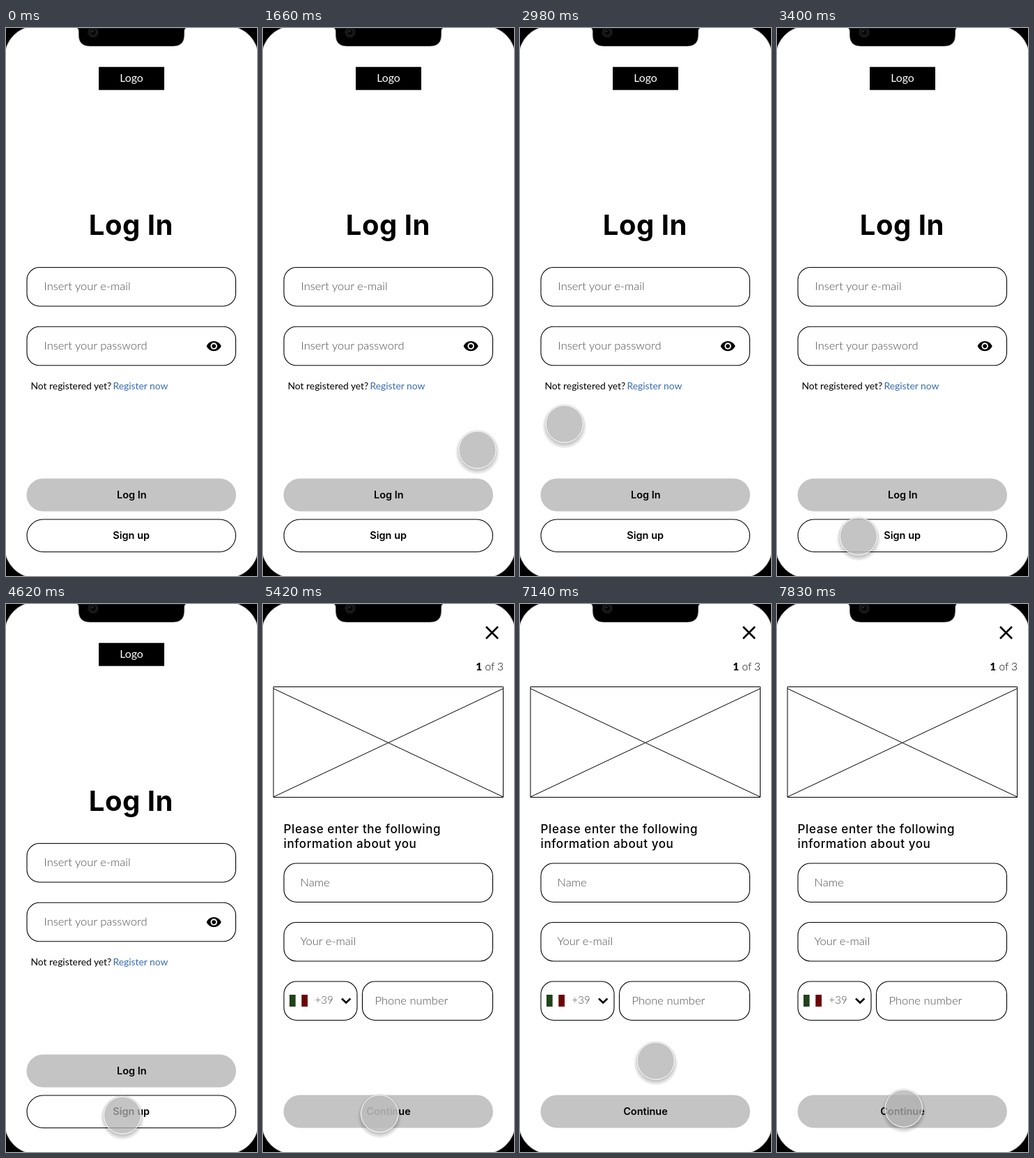
An HTML page for the animation above (8000 ms loop, 360 by 784 pixels).

```html
<!DOCTYPE html>
<html lang="en">
<head>
<meta charset="utf-8">
<title>Sign-up prototype</title>
<style>
  html, body { margin: 0; width: 100%; height: 100%; overflow: hidden; background: #000; }
  svg { display: block; width: 360px; height: 784px; }
  text { font-family: Lato, "Open Sans", sans-serif; }
  .field { fill: none; stroke: #000; stroke-width: 1.1; }
  .hint { font-size: 16.5px; font-weight: 300; fill: #4c4c4c; }
  .code { font-size: 15px; }
  .note { font-size: 13.85px; }
  .button { font: 600 14.5px Inter, sans-serif; text-anchor: middle; }
  .title { font: 700 40px Inter, sans-serif; letter-spacing: .5px; text-anchor: middle; }
  .lead { font: 500 17px Inter, sans-serif; letter-spacing: .6px; }
  .line { fill: none; stroke: #000; }
</style>
</head>
<body>
<svg viewBox="0 0 360 784">
  <defs>
    <radialGradient id="shade">
      <stop offset=".78" stop-color="#000" stop-opacity=".22"/>
      <stop offset="1" stop-color="#000" stop-opacity="0"/>
    </radialGradient>
    <mask id="outside" maskUnits="userSpaceOnUse" x="-40" y="-40" width="80" height="84">
      <rect x="-40" y="-40" width="80" height="84" fill="#fff"/>
      <circle r="27" fill="#000"/>
    </mask>
    <clipPath id="screen"><rect x="-2" y="-3" width="364" height="790" rx="45"/></clipPath>
  </defs>

  <rect width="360" height="784"/>
  <rect x="-2" y="-3" width="364" height="790" rx="45" fill="#fff" stroke="#888" stroke-width=".7"/>

  <g id="login">
    <rect x="133" y="55.7" width="94" height="33"/>
    <text x="180" y="77" font-size="15.8" fill="#fff" text-anchor="middle">Logo</text>
    <text class="title" x="179.3" y="296">Log In</text>
    <rect class="field" x="30" y="342.5" width="299.5" height="55.5" rx="18"/>
    <text class="hint" x="54.5" y="375">Insert your e-mail</text>
    <rect class="field" x="30" y="427.3" width="299.5" height="55.5" rx="18"/>
    <text class="hint" x="54.5" y="459.5">Insert your password</text>
    <path transform="translate(286.7 443.6) scale(.955)" fill-rule="evenodd" d="M12 4.5C7 4.5 2.73 7.61 1 12c1.73 4.39 6 7.5 11 7.5s9.27-3.11 11-7.5c-1.73-4.39-6-7.5-11-7.5zM7 12a5 5 0 0 1 10 0a5 5 0 0 1-10 0zM9 12a3 3 0 0 1 6 0a3 3 0 0 1-6 0z"/>
    <text class="note" x="35.5" y="517">Not registered yet?</text>
    <text class="note" x="153.5" y="517" fill="#386cb0">Register now</text>
    <rect x="29.5" y="644.5" width="300.5" height="47" rx="23.5" fill="#c4c4c4"/>
    <text class="button" x="180.3" y="673">Log In</text>
    <rect class="field" x="30" y="703" width="299.5" height="46.5" rx="23.2"/>
    <text class="button" x="179.7" y="731">Sign up</text>
  </g>

  <g id="signup">
    <path class="line" stroke-width="2.5" d="M320 32.5L337 49.5M337 32.5L320 49.5"/>
    <text x="345" y="95" font-size="15.4" font-weight="300" text-anchor="end"><tspan font-weight="800">1</tspan> of 3</text>
    <path class="line" d="M15 118.5H344.5V276.5H15ZM15 121L344.5 276M15 276L344.5 121"/>
    <text class="lead" x="29.5" y="328">Please enter the following</text>
    <text class="lead" x="29.5" y="348.5">information about you</text>
    <rect class="field" x="30" y="371" width="299.5" height="55.5" rx="18"/>
    <text class="hint" x="53.5" y="403.5">Name</text>
    <rect class="field" x="30" y="455.5" width="299.5" height="55.5" rx="18"/>
    <text class="hint" x="53.5" y="488">Your e-mail</text>
    <rect class="field" x="30" y="540" width="105" height="55.5" rx="18"/>
    <path fill="#21421a" d="M38 559h8.7v17H38z"/>
    <path fill="#6b0505" d="M55.3 559H64v17h-8.7z"/>
    <text class="hint code" x="74.5" y="572.3">+39</text>
    <path class="line" stroke-width="2.6" d="M113 564.5L119.2 570.5L125.4 564.5"/>
    <rect class="field" x="142.5" y="540" width="187" height="55.5" rx="18"/>
    <text class="hint" x="160.5" y="572.5">Phone number</text>
    <rect x="29.5" y="702.5" width="300.5" height="47" rx="23.5" fill="#c4c4c4"/>
    <text class="button" x="180" y="731">Continue</text>
  </g>

  <path d="M102 0H258Q255.7 1 255.7 5V10Q255.7 26 239.7 26H120.3Q104.3 26 104.3 10V5Q104.3 1 102 0Z" stroke="#777" stroke-width=".5"/>
  <circle cx="125" cy="6" r="8" fill="#151515"/>
  <circle cx="125" cy="6" r="4.5" fill="#050505" stroke="#292929"/>
  <circle cx="124" cy="5" r="1.3" fill="#34343a"/>

  <g clip-path="url(#screen)">
    <g id="pointer">
      <circle cy="3.5" r="32" fill="url(#shade)" mask="url(#outside)"/>
      <circle id="disc" r="26.5"/>
      <circle r="27.5" fill="none" stroke="#b4b4b4" stroke-width=".6"/>
      <circle r="26.7" fill="none" stroke="#fff"/>
    </g>
  </g>
</svg>
<script>
  const LOOP = 8000, STEP = 70, PAGE_TURN = 4690;
  const $ = id => document.getElementById(id);
  const login = $('login'), signup = $('signup'), pointer = $('pointer'), disc = $('disc');

  const easeIn = k => u => u ** k;
  const easeOut = k => u => 1 - (1 - u) ** k;
  const smooth = u => u * u * (3 - 2 * u);

  // Each move: start time, number of steps, easing, Bezier points
  const moves = [
    [1170, 8, easeOut(2), [[395, 830], [350, 690], [307.5, 603.5]]],
    [1990, 12, easeIn(1.78), [[307.5, 603.5], [265, 495], [204, 490], [120.5, 504]]],
    [2840, 12, easeOut(1.7), [[120.5, 504], [50, 506], [20, 676], [149.5, 751]]],
    [3680, 6, easeOut(1.6), [[149.5, 751], [162, 750], [167, 731.5]]],
    [5420, 11, smooth, [[167, 731.5], [172, 680], [189.5, 638.5]]],
    [7000, 11, smooth, [[189.5, 638.5], [208, 680], [181.8, 721.5]]],
  ];
  const presses = [[4490, 5150], [7830, LOOP]];

  function bezier(points, s) {
    if (points.length === 1) return points[0];
    const next = points.slice(1).map(([x, y], i) => {
      const [px, py] = points[i];
      return [px + (x - px) * s, py + (y - py) * s];
    });
    return bezier(next, s);
  }

  function draw(t) {
    login.style.display = t < PAGE_TURN ? '' : 'none';
    signup.style.display = t < PAGE_TURN ? 'none' : '';

    const move = moves.filter(([start]) => t >= start).pop();
    pointer.style.display = move ? '' : 'none';
    if (move) {
      const [start, steps, ease, points] = move;
      const u = Math.min(1, (Math.floor((t - start) / STEP) + 1) / steps);
      pointer.setAttribute('transform', `translate(${bezier(points, ease(u))})`);
      const pressed = presses.some(([from, to]) => t >= from && t < to);
      const alpha = pressed ? .75 : .88;
      // The disc keeps the same grey over white at either opacity
      const grey = Math.round(255 - 59 / alpha);
      disc.setAttribute('fill', `rgba(${grey},${grey},${grey},${alpha})`);
    }
  }

  function tick() {
    draw(performance.now() % LOOP);
    requestAnimationFrame(tick);
  }
  tick();
</script>
</body>
</html>
```
